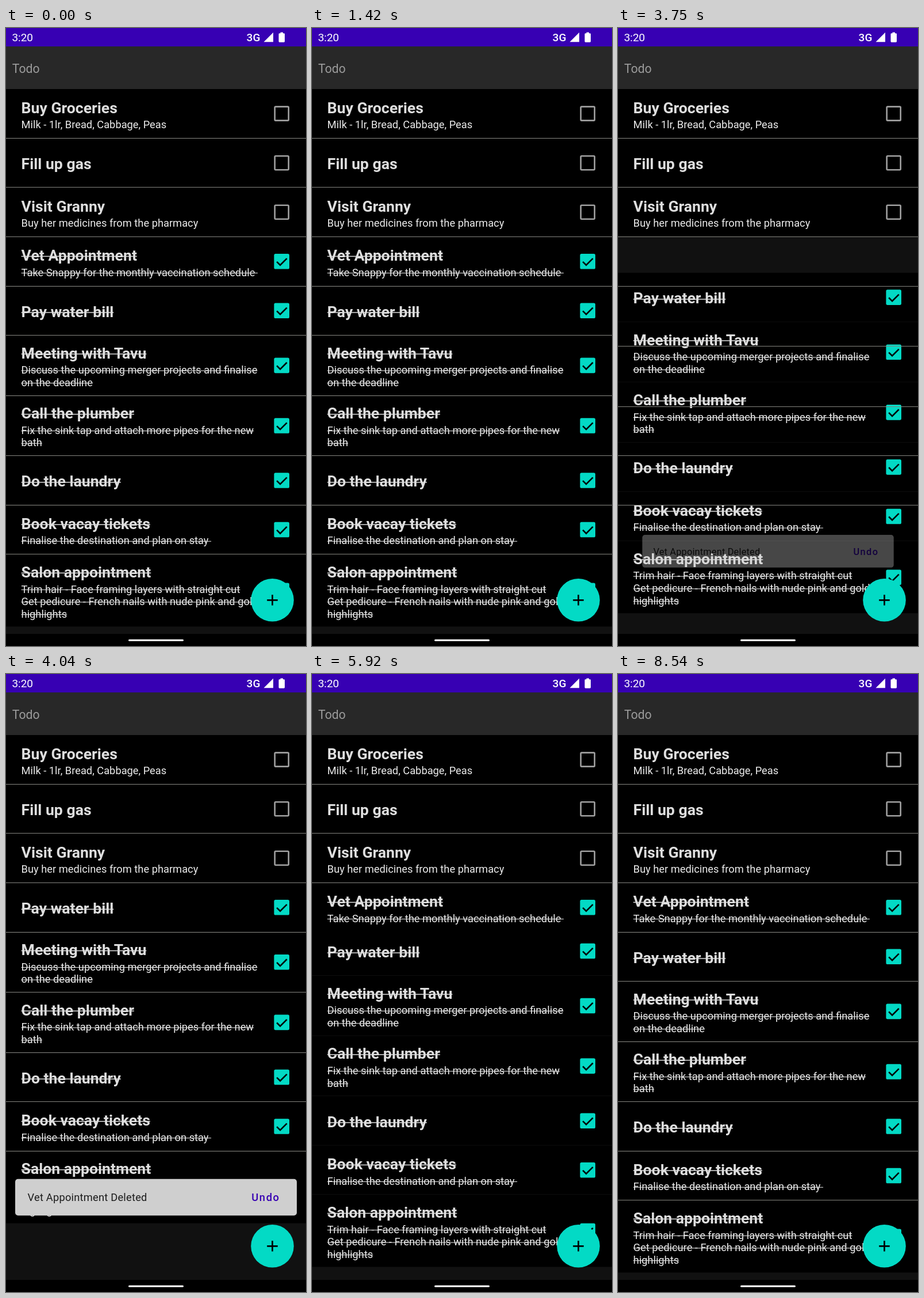
Animation, 522 px wide and 1073 px high, one loop 8620 ms. Source, as an HTML page:

```html
<!DOCTYPE html>
<html lang="en">
<head>
<meta charset="utf-8">
<title>Todo</title>
<style>
  html, body { margin: 0; width: 100%; height: 100%; overflow: hidden; background: #000; }
  svg { display: block; font-family: Roboto, sans-serif; }
  text { white-space: pre; }
  .title { font-size: 26.6px; font-weight: 700; fill: #dedede; }
  .note { font-size: 18.3px; fill: #ebebeb; }
  .bar { font-size: 19px; fill: #fff; }
</style>
</head>
<body>
<svg width="522" height="1073" viewBox="0 0 522 1073">
  <rect width="522" height="1073" fill="#111"/>
  <g id="rows"></g>
  <g id="lines" fill="#858580"></g>

  <g id="snack" opacity="0">
    <rect x="16" y="876.7" width="490" height="63.5" rx="5" fill="#cfcfcf"/>
    <text x="37.5" y="915.3" font-size="18.3" letter-spacing=".22" fill="#1c1c1c">Vet Appointment Deleted</text>
    <text x="427.3" y="915.3" font-size="18.3" font-weight="500" letter-spacing="1.63" fill="#3700b3">Undo</text>
  </g>

  <circle cx="463.5" cy="993.3" r="37.3" fill="#03dac5"/>
  <path d="M454.2 993.3h18.6M463.5 984v18.6" stroke="#000" stroke-width="2.7"/>

  <rect y="32" width="522" height="74" fill="#282828"/>
  <text x="10.8" y="78" font-size="21.2" fill="#9b9b9b">Todo</text>

  <rect width="522" height="32" fill="#3700b3"/>
  <text class="bar" x="10.4" y="23.2">3:20</text>
  <text class="bar" x="418.6" y="22.6" font-weight="500">3G</text>
  <path d="M448.5 24.3h16.5v-16.5z" fill="#fff"/>
  <path d="M477.5 7.5h4.5v1.8h1.6q1.4 0 1.4 1.4v12.6q0 1.4-1.4 1.4h-7.7q-1.4 0-1.4-1.4v-12.6q0-1.4 1.4-1.4h1.6z" fill="#fff"/>

  <rect y="1052" width="522" height="21" fill="#000"/>
  <rect x="213" y="1061.6" width="96" height="3" rx="1.5" fill="#fff"/>
</svg>
<script>
(() => {
  const LOOP = 8620, ROW = 85.53, LIST_TOP = 106, GONE = 3;
  const ITEMS = [
    ["Buy Groceries", ["Milk - 1lr, Bread, Cabbage, Peas"], false],
    ["Fill up gas", [], false],
    ["Visit Granny", ["Buy her medicines from the pharmacy"], false],
    ["Vet Appointment", ["Take Snappy for the monthly vaccination schedule "], true],
    ["Pay water bill", [], true],
    ["Meeting with Tavu", ["Discuss the upcoming merger projects and finalise", "on the deadline"], true],
    ["Call the plumber", ["Fix the sink tap and attach more pipes for the new", "bath"], true],
    ["Do the laundry", [], true],
    ["Book vacay tickets", ["Finalise the destination and plan on stay "], true],
    ["Salon appointment", ["Trim hair - Face framing layers with straight cut",
      "Get pedicure - French nails with nude pink and gold", "highlights"], true]
  ];
  // Both indexed by the number of note lines.
  const HEIGHTS = [ROW, ROW, 104.6, 126.1];
  const BASELINES = [53.5, 41.5, 40, 40];

  const byId = id => document.getElementById(id);
  function add(parent, tag, attrs, text) {
    const el = document.createElementNS("http://www.w3.org/2000/svg", tag);
    for (const k in attrs) el.setAttribute(k, attrs[k]);
    if (text) el.textContent = text;
    return parent.appendChild(el);
  }

  function label(g, cls, y, text, struck) {
    const el = add(g, "text", { class: cls, x: 26.6, y }, text);
    if (!struck) return;
    const size = cls === "title" ? 26.6 : 18.3;
    add(g, "rect", {
      class: cls, x: 26.6, y: y - size * 0.315,
      width: el.getComputedTextLength(), height: size / 18
    });
  }

  function checkbox(g, cy, on) {
    if (on) {
      add(g, "rect", { x: 466.4, y: cy - 13.3, width: 26.6, height: 26.6, rx: 2.6, fill: "#03dac5" });
      add(g, "path", { d: `M471.2 ${cy + 0.6}l5.9 5.9 11.6-11.6`, fill: "none", stroke: "#000", "stroke-width": 2.6 });
    } else {
      add(g, "rect", { x: 467.7, y: cy - 12, width: 24, height: 24, rx: 1.4, fill: "none", stroke: "#a0a0a0", "stroke-width": 2.6 });
    }
  }

  let nextY = LIST_TOP;
  const rows = ITEMS.map(([title, notes, done]) => {
    const y = nextY, n = notes.length, h = HEIGHTS[n], base = y + BASELINES[n];
    const g = add(byId("rows"), "g", {});
    add(g, "rect", { y, width: 522, height: h - 0.8, fill: "#000" });
    label(g, "title", base, title, done);
    notes.forEach((s, i) => label(g, "note", base + 26.6 + i * 21.6, s, done));
    checkbox(g, y + h / 2 - 0.1, done);
    nextY += h;
    return { g, h };
  });

  // Separators sit at laid-out row bottoms and ignore row movement.
  function separators(list) {
    const g = add(byId("lines"), "g", {});
    let y = LIST_TOP;
    list.slice(0, -1).forEach(r => {
      y += r.h;
      add(g, "rect", { y: Math.floor(y - 0.1), width: 522, height: 1 });
    });
    return g;
  }
  const full = separators(rows);
  const short = separators(rows.filter((r, i) => i !== GONE));
  const head = separators(rows.slice(0, GONE + 1));
  const snack = byId("snack");

  const span = (t, from, len) => Math.min(1, Math.max(0, (t - from) / len));
  const ease = x => 0.5 - Math.cos(Math.PI * x) / 2;
  const show = (el, on) => el.setAttribute("display", on ? "inline" : "none");

  function draw(t) {
    const removed = t >= 3540 && t < 5726;
    const returning = t >= 5726 && t < 5976;
    const swipe = t < 5726 ? -522 * ease(span(t, 3000, 520)) : 0;
    const lift = -ROW * (ease(span(t, 3664, 250)) - ease(span(t, 5726, 250)));

    rows.forEach(({ g }, i) => {
      if (i === GONE) g.setAttribute("transform", `translate(${swipe} 0)`);
      if (i > GONE) g.setAttribute("transform", `translate(0 ${lift})`);
    });
    show(rows[GONE].g, !removed);
    show(full, !removed && !returning);
    show(short, removed);
    show(head, returning);

    const enter = span(t, 3700, 150);
    const scale = 0.8 + 0.2 * (1 - Math.pow(1 - enter, 1.5));
    snack.setAttribute("opacity", enter * (1 - span(t, 5690, 75)));
    snack.setAttribute("transform", `translate(261 908.4) scale(${scale}) translate(-261 -908.4)`);
  }

  const start = performance.now();
  function tick() {
    draw((performance.now() - start) % LOOP);
    requestAnimationFrame(tick);
  }
  tick();
})();
</script>
</body>
</html>
```
